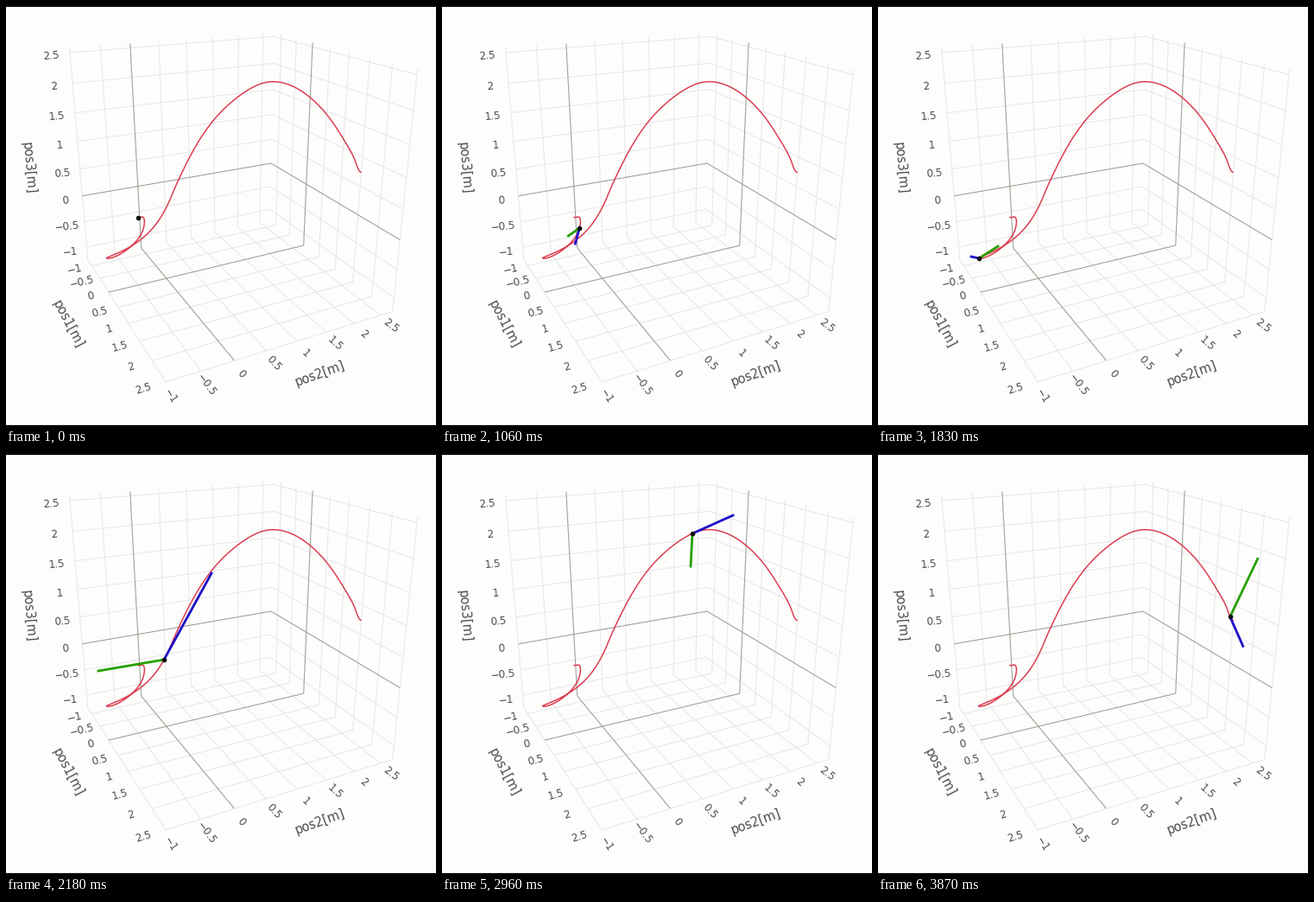
These frames come from a looping animation (498 px wide and 486 px high, 3.94 s). A matplotlib script:

```python
from math import perm

import numpy as np
import matplotlib.pyplot as plt
from matplotlib.animation import FuncAnimation
from matplotlib.collections import LineCollection

W, H, DPI = 498, 486, 100
PX = 72 / DPI  # points per pixel
TICK_MS, LOOP_MS, STEPS = 20, 3940, 56

PAPER, GRID, ZERO = "#fdfdfc", "#e8e8ec", "#a0a09a"
INK, RED, GREEN, BLUE = "#4c4c4a", "#dc3c50", "#27a000", "#1c10c8"

# Perspective camera: vanishing point and depth rate for each axis
CORNER = np.array([307, 182])
VANISH = np.array([[-147, -87], [1870, -88], [260, 2177]])
RATE = np.array([-0.066, -0.0329, -0.0274])
X0, X1 = -1.25, 2.5
Y0, Y1 = -1.0, 2.73
Z0, Z1 = -1.25, 2.57
TICKS = np.arange(-1, 2.6, 0.5)

# Arrow length per unit of velocity and of acceleration
V_SCALE, A_SCALE = 4.5, 17

# Key poses: step, position, velocity arrow, acceleration arrow
POSES = np.array([
    [0, 153, 244.5, 0, 0, 0, 0],
    [9, 157.8, 244, 5, 1, 1, 11],
    [15, 159.3, 257, -5, 18, -13, 9],
    [26, 117, 292, -9, -2, 22, -14],
    [31, 183, 238, 55, -100, -76, 13],
    [33, 201.5, 197.5, 44, -93, -5, 34],
    [42, 290, 92, 47, -21, -2, 38],
    [51, 383, 141.5, 39, 60, -5, 26],
    [55, 407.7, 188.3, 15, 34, 32, -67]])


def project(x, y, z):
    """Map a point of the 3D scene to screen pixels."""
    w = RATE * np.array([x - X0, Y1 - y, z])
    return (CORNER + w @ VANISH) / (1 + w.sum())


def motion(t, order=0):
    """Position or its derivative, by quintic blending of the key poses."""
    i = np.clip(np.searchsorted(POSES[:, 0], t, side="right") - 1,
                0, len(POSES) - 2)
    (t0, *start), (t1, *end) = POSES[i], POSES[i + 1]
    h = t1 - t0
    unit = np.array([[1], [h / V_SCALE], [h * h / A_SCALE]])
    p0, v0, a0 = np.reshape(start, (3, 2)) * unit
    p1, v1, a1 = np.reshape(end, (3, 2)) * unit
    dp, dv, da = p1 - p0 - v0 - a0 / 2, v1 - v0 - a0, a1 - a0
    coef = [p0, v0, a0 / 2, 10 * dp - 4 * dv + da / 2,
            -15 * dp + 7 * dv - da, 6 * dp - 3 * dv + da / 2]
    s = (t - t0) / h
    return sum(perm(k, order) * s ** (k - order) * coef[k]
               for k in range(order, 6)) / h ** order


def tick_lines(t):
    """The grid lines at value t on the floor and both walls."""
    ends = [((t, Y0, Z0), (t, Y1, Z0)), ((t, Y1, Z0), (t, Y1, Z1)),
            ((X0, t, Z0), (X1, t, Z0)), ((X0, t, Z0), (X0, t, Z1)),
            ((X0, Y0, t), (X0, Y1, t)), ((X0, Y1, t), (X1, Y1, t))]
    return [[project(*a), project(*b)] for a, b in ends]


fig = plt.figure(figsize=(W / DPI, H / DPI), dpi=DPI, facecolor=PAPER)
ax = fig.add_axes([0, 0, 1, 1])
ax.set(xlim=(0, W), ylim=(H, 0))
ax.axis("off")


def write(pos, text, size, angle):
    ax.text(*pos, text, size=size * PX, rotation=angle, color=INK,
            family="DejaVu Sans", ha="center", va="center")


def angle_of(a, b):
    dx, dy = b - a
    return np.degrees(np.arctan2(-dy, dx))


grid = [line for t in TICKS if t != 0 for line in tick_lines(t)]
for lines, color in ((grid, GRID), (tick_lines(0), ZERO)):
    ax.add_collection(LineCollection(lines, colors=color, linewidths=1.1 * PX))

for t in TICKS:
    name = f"{t:g}".replace("-", "\u2212")
    tick, spot = project(t, Y0, Z0), project(t, Y0 - 0.3, Z0)
    write(spot, name, 12, angle_of(spot, tick))
    tick, spot = project(X1, t, Z0), project(X1 + 0.29, t, Z0)
    write(project(X1 + 0.29, t - 0.05, Z0), name, 12, angle_of(tick, spot))
    write(project(X0, Y0 - 0.3, t - 0.025), name, 12, 5)

write((71.5, 368.5), "pos1[m]", 14.5, -62)
write((363.5, 426), "pos2[m]", 14.5, 20)
write((25.5, 187), "pos3[m]", 14.5, -85)

for y in (0, H - 1):
    ax.axhspan(y, y + 1, color="black", lw=0)

path = np.array([motion(t) for t in np.linspace(0, 55.7, 500)])
ax.plot(*path.T, color=RED, lw=1.5 * PX, zorder=4)
green, = ax.plot([], [], color=GREEN, lw=2.8 * PX, zorder=5)
blue, = ax.plot([], [], color=BLUE, lw=2.8 * PX, zorder=6)
dot, = ax.plot([], [], "o", color="#0c0c08", ms=5.6 * PX, mew=0, zorder=7)

# Steps last 70 ms, two of them 80 ms
steps = np.arange(STEPS)
STARTS = 70 * steps + 10 * (steps > 13) + 10 * (steps > 38)


def update(frame):
    now = frame * TICK_MS + TICK_MS / 2
    step = np.searchsorted(STARTS, now, side="right") - 1
    base = motion(step)
    for arrow, order, scale in ((blue, 1, V_SCALE), (green, 2, A_SCALE)):
        tip = base + scale * motion(step, order)
        arrow.set_data(*np.array([base, tip]).T)
    dot.set_data([base[0]], [base[1]])
    return green, blue, dot


anim = FuncAnimation(fig, update, frames=LOOP_MS // TICK_MS,
                     interval=TICK_MS, repeat=True, repeat_delay=0)
plt.show()
```
